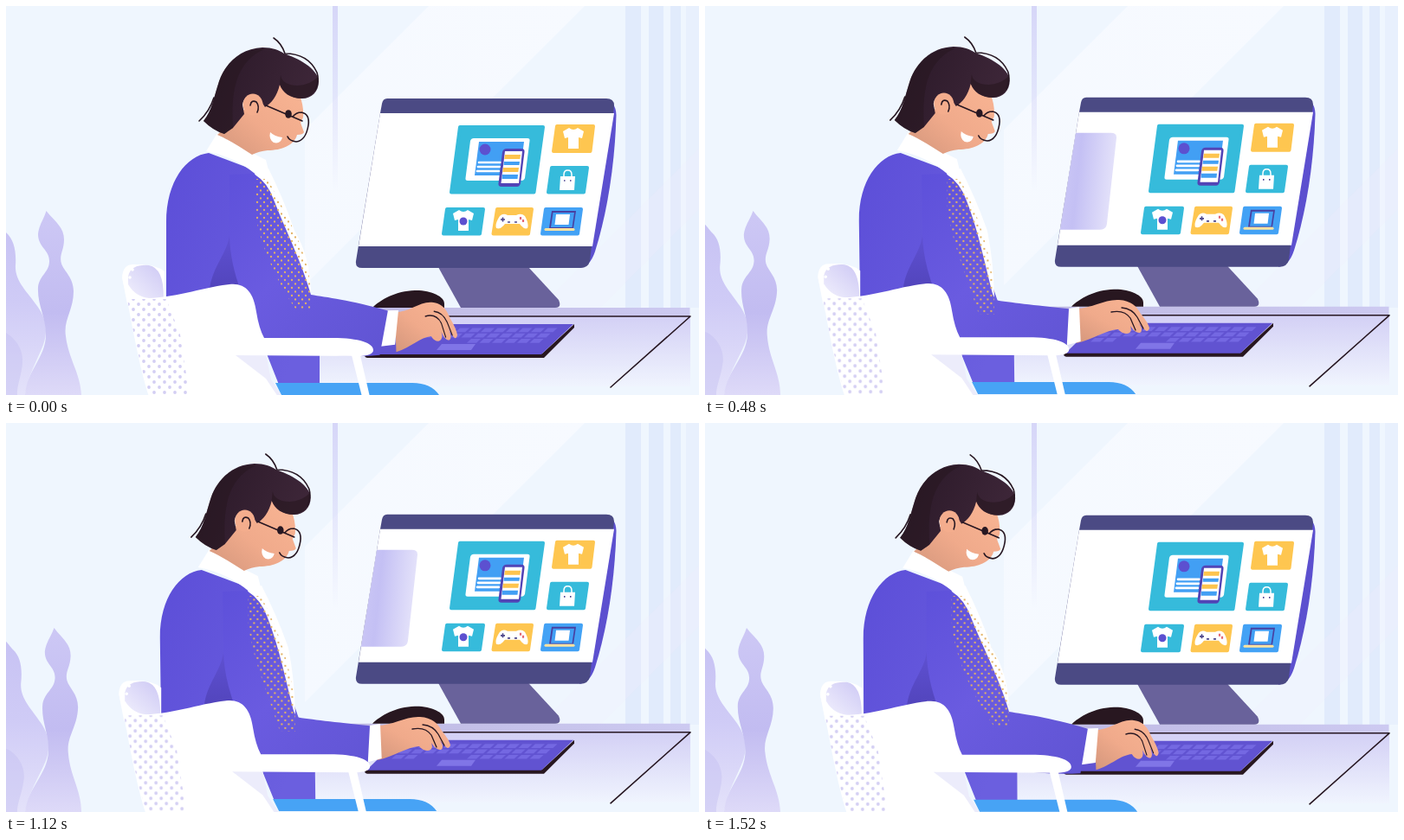
Recreate the animation shown at these times as an HTML page. Size 800 px wide and 450 px high, loop 1.6 s.

```html
<!DOCTYPE html>
<html lang="en">
<head>
<meta charset="utf-8">
<title>At the desk</title>
<style>
html, body { margin: 0; width: 100%; height: 100%; overflow: hidden; background: #eff6fe; }
svg { display: block; width: 800px; height: 450px; }
.tile { stroke-width: 4; stroke-linejoin: round; }
.cyan { fill: #36bbdb; stroke: #36bbdb; }
.gold { fill: #fec650; stroke: #fec650; }
.blue { fill: #43a2f5; stroke: #43a2f5; }
.ink { fill: none; stroke: #271722; stroke-width: 1.6; stroke-linecap: round; stroke-linejoin: round; }
.white { fill: #fff; }
</style>
</head>
<body>
<svg viewBox="0 0 800 450">
<defs>
  <linearGradient id="pole" x2="0" y2="1"><stop stop-color="#d6d6f8"/><stop offset="1" stop-color="#d6d6f8" stop-opacity="0"/></linearGradient>
  <linearGradient id="glare" x1="1" y1="0" x2="0" y2="1"><stop stop-color="#f7faff"/><stop offset="1" stop-color="#f5f9ff"/></linearGradient>
  <linearGradient id="leaf" x2="0" y2="1"><stop stop-color="#c6c1f3"/><stop offset=".5" stop-color="#cfcbf6"/><stop offset="1" stop-color="#e4e2fa"/></linearGradient>
  <linearGradient id="stem" x2="0" y2="1"><stop stop-color="#cdc8f5"/><stop offset=".55" stop-color="#c2bcf1"/><stop offset="1" stop-color="#dedaf8"/></linearGradient>
  <linearGradient id="desk" x2="0" y2="1"><stop stop-color="#d3d0f5"/><stop offset="1" stop-color="#f0f4fe"/></linearGradient>
  <linearGradient id="top" x2="1"><stop stop-color="#bdb8e2"/><stop offset="1" stop-color="#cdcaf1"/></linearGradient>
  <linearGradient id="panel" x2="1" y2=".15"><stop stop-color="#cfcbf6"/><stop offset=".45" stop-color="#c4c0f4"/><stop offset="1" stop-color="#e4e2fa"/></linearGradient>
  <linearGradient id="coat" x2="1" y2=".6"><stop stop-color="#5c4ed8"/><stop offset="1" stop-color="#6b5fdf"/></linearGradient>
  <linearGradient id="arm" gradientUnits="userSpaceOnUse" x1="240" y1="200" x2="430" y2="390"><stop stop-color="#5d50da"/><stop offset=".5" stop-color="#6a5be0"/><stop offset="1" stop-color="#6155d4"/></linearGradient>
  <linearGradient id="fold" x2="0" y2="1"><stop stop-color="#5f51d2"/><stop offset="1" stop-color="#4d40b4"/></linearGradient>
  <linearGradient id="knob" x1="1" x2="0" y2="1"><stop stop-color="#cdc8f4"/><stop offset="1" stop-color="#f1f0fd"/></linearGradient>
  <linearGradient id="skin" x1="1" x2="0" y2="1"><stop stop-color="#f9b594"/><stop offset=".55" stop-color="#f0aa8b"/><stop offset="1" stop-color="#d3967c"/></linearGradient>
  <linearGradient id="hair" x2="1" y2=".3"><stop stop-color="#2b1926"/><stop offset=".3" stop-color="#2f1c2c"/><stop offset="1" stop-color="#3d2638"/></linearGradient>
  <pattern id="gold" width="8" height="9" patternUnits="userSpaceOnUse"><g fill="#e2b264"><circle cx="2" cy="2" r="1.15"/><circle cx="6" cy="6.5" r="1.15"/></g></pattern>
  <pattern id="spots" width="12" height="12" patternUnits="userSpaceOnUse"><g fill="#d3cef3"><circle cx="3" cy="3" r="1.9"/><circle cx="9" cy="9" r="1.9"/></g></pattern>
  <clipPath id="screen"><path d="M432 124H702L677 278H407Z"/></clipPath>
  <path id="tee" d="M-5 -12Q0 -8 5 -12L12 -8 10 0 6 -1V12H-6V-1L-10 0-12 -8Z"/>
</defs>

<rect width="800" height="450" fill="#eff6fe"/>
<path d="M488 0H668L345 323V143Z" fill="url(#glare)"/>
<path d="M377 0h6V215h-6Z" fill="url(#pole)"/>
<path d="M715 0h18V349h-18ZM742 0h17V349h-17ZM767 0h12V349h-12Z" fill="#e1ebfc"/>
<path d="M785 0h15V349h-15Z" fill="#e8f0fd"/>
<path d="M800 165 616 349h70L800 235Z" fill="#efe9fb" opacity=".25"/>

<g id="plants">
  <path d="M-30 236L-14 248C-8 252 -4 258 0 262C9 270 12 283 11 300C10 318 24 330 36 347C46 361 49 375 43 392C36 410 25 428 22 450H-30Z" fill="url(#leaf)"/>
  <path d="M-20 372L0 378C10 384 20 396 19 412C18 428 12 440 13 450H-20Z" fill="#c4bef0" opacity=".45"/>
  <path d="M46.5 237C54 247 67 255 67 270C67 283 61 288 64 298C67 307 78 314 78 330C78 352 66 363 69 382C72 408 86 425 87 450H22C24 421 46 407 46 380C46 359 36 346 37 325C39 311 50 308 50 295C50 282 37 279 37 264C38 253 44 246 46.5 237Z" fill="url(#stem)"/>
</g>

<g id="set">
  <path d="M340 359H790V440H340Z" fill="url(#desk)"/>
  <path d="M360 349H789.5V359H360Z" fill="url(#top)"/>
  <path d="M499 302H603L638 340Q642 349 634 349H525Z" fill="#69629b"/>
  <path class="ink" d="M505 359H790L698 441"/>

  <path d="M690 108Q704 110 704.500 126C703 180 695 236 680 284Q674 302 662 303Z" fill="#5c50cf"/>
  <path d="M440 107H693Q702 107 702 115L701 124 676 278 674 295Q672 303 663 303H411Q403 303 404 295L432 124 434 113Q435 107 440 107Z" fill="#4b4a84"/>
  <path class="white" d="M432 124H702L677 278H407Z"/>
  <g clip-path="url(#screen)"><path id="slide" d="M-12 -61H33Q41 -61 40 -54L28 54Q27 61 19 61H-33Q-41 61 -40 54L-25 -52Q-23 -61 -12 -61Z" fill="url(#panel)"/></g>

  <g class="tile">
    <path class="cyan" d="M524 140H620L609.500 215.500H514Z"/>
    <path class="gold" d="M636 139H678L674.500 168H632Z"/>
    <path class="cyan" d="M630 187H671L667 215.500H626Z"/>
    <path class="cyan" d="M509 235H551L547 263.500H505Z"/>
    <path class="gold" d="M567 235H607L603 263.500H562.500Z"/>
    <path class="blue" d="M623 235H664L660 263.500H619Z"/>
  </g>
  <path class="white" d="M540 153H602Q605 153 604.500 156L599 199Q598 202 595 202H533Q530 202 530.500 199L536 156Q537 153 540 153Z"/>
  <path d="M546 157H598L593 196H541Z" fill="#429ff4"/>
  <circle cx="553" cy="166" r="6.500" fill="#5c50d0"/>
  <path d="M546 181H571M545 186H570M544 191H569" stroke="#fff" stroke-width="2.700" stroke-linecap="round"/>
  <path d="M578 165H595Q599 165 598.500 169L594 205Q593 209 590 209H572Q568 209 568.500 205L573 169Q574 165 578 165Z" fill="#5144b6"/>
  <path class="white" d="M576 168H596L592 205H571.500Z"/>
  <path d="M576 172H594L593.300 177H575.300ZM574 187H592L591.300 192H573.300Z" fill="#fdc44e"/>
  <path d="M575 180H593L592.500 184H574.500ZM573 195H591L590.500 200H572.500Z" fill="#429ff4"/>
  <use href="#tee" class="white" x="655" y="153"/>
  <use href="#tee" class="white" x="528" y="248"/>
  <circle cx="528" cy="249" r="4.500" fill="#5c50d0"/>
  <path class="white" d="M640 197H657L656 213H639Z"/>
  <path d="M644 198V195Q644 190 648.500 190T653 195V198" fill="none" stroke="#fff" stroke-width="1.500"/>
  <path d="M644 202h1.500M651 202h1.500" stroke="#443c8c" stroke-width="1.700"/>
  <path class="white" d="M570 243Q574 239 579 242H589Q595 239 599 243Q604 252 602 257Q598 259 593 252H576Q571 259 566 257Q564 252 570 243Z"/>
  <path d="M571 247h5M573.500 244.500v5M579 250h3M587 250h3" stroke="#4d478c" stroke-width="1.700"/>
  <path d="M594 244v3M597 247v3" stroke="#e46874" stroke-width="2.200"/>
  <path d="M630 237H658L655 257H627Z" fill="#4840a1"/>
  <path d="M631.500 239H656L653.500 256H629Z" fill="#429ff4"/>
  <path class="white" d="M635 241H651L649.500 253H633.500Z"/>
  <path d="M623 258.500H655" stroke="#ffe2a0" stroke-width="3" stroke-linecap="round"/>

  <path d="M423 349C432 340 450 329.500 472 329C490 328.500 507 336 506 345V349Z" fill="#281720"/>
  <path d="M416 402H619L656 368V372L621 407H417Q412 406 416 402Z" fill="#281720"/>
  <path d="M452 368H655L618 403H416Z" fill="#6153d1"/>
  <path id="keys" fill="#7468e2"/>
  <path d="M503 391H542L537 398H497Z" fill="#8075e7"/>
</g>

<g id="torso">
  <path d="M234 170C208 173 185 203 185 250V345L300 400 315 438H362V395L330 300 304 207 287 190Z" fill="url(#coat)"/>
  <path d="M258 265C256 285 238 302 235 327L278 350Z" fill="url(#fold)"/>
</g>
<path id="shirt" class="white"/>
<path id="legs" d="M311 436H466Q490 435 500 450H318Z" fill="#47a3f5"/>

<g id="hand">
  <path d="M-5 2C15 2 29 -9 46 -8C60 -7 66 -1 71 8Q80 19 81 25Q79 31 74 25L68 18Q75 27 70 30Q65 31 59 22Q62 30 55 31Q49 31 45 26C30 27 18 37 -3 42Z" fill="url(#skin)"/>
  <path class="ink" d="M49 1Q61 2 67 12L74 25M37 6Q52 3 59 13L65 27" style="stroke-width:1.3"/>
</g>
<path id="cuff" class="white"/>
<path id="sleeve" fill="url(#arm)"/>
<path id="dots" fill="url(#gold)"/>

<g id="head">
  <path class="white" d="M244 147 231 168Q264 174 290 196L303 190 300 178 280 168Z"/>
  <path d="M244 149 272 122 315 90 339 103Q344 116 343 129L340 135 344 146Q343 149 336 149C333 161 318 167 302 167Q292 168 284 172C271 164 258 155 244 149Z" fill="url(#skin)"/>
  <path d="M228 133C238 121 240 105 246 87C253 67 270 49 296 48C308 48 315 51 321 55C336 60 360 72 361 87C361 99 353 107 342 107C328 107 319 100 316 91C313 104 306 113 299 117L292 106Q276 99 273 114L275 125 262 141 252 148Q239 144 228 133Z" fill="url(#hair)"/>
  <path d="M228 133C238 121 240 105 246 87C253 67 270 49 298 50C262 66 260 106 262 141L252 148Q239 144 228 133Z" fill="#27161f" opacity=".5"/>
  <path d="M317 80Q318 88 328 91Q347 95 360 82Q362 104 341 107Q324 107 316 91Z" fill="#291821" opacity=".65"/>
  <ellipse cx="285" cy="114" rx="11.500" ry="12.500" fill="#f4ad8d"/>
  <path class="ink" d="M282 115Q283 108 289 111Q293 116 290 123"/>
  <path class="ink" d="M309 37Q318 43 322 55Q349 55 359 77Q362 87 357 97M223 133Q235 122 240 106"/>
  <path class="white" d="M305 146Q310 151 319 152Q317 160 309 158Q303 154 305 146Z"/>
  <path class="ink" d="M300 115 342 133M341 123Q351 125 349 138Q346 156 335 157Q327 156 325 151M341 123Q335 123 331 128"/>
  <ellipse id="eye" cx="326" cy="125" rx="3.800" ry="4.800" fill="#271722"/>
</g>

<g id="chair">
  <path class="white" d="M134 314Q135 298 148 299Q172 298 183 307V345H140Z"/>
  <path d="M141 313C143 302 153 299 165 300Q182 303 182 337Q153 343 141 322Z" fill="url(#knob)"/>
  <path class="white" d="M398 400H408L420 452H411Z"/>
  <path d="M262 400 300 403 306 432 319 452H245Z" fill="#ececfb"/>
  <path class="white" d="M134 312Q137 336 148 338C192 340 222 326 258 322C276 320 286 331 289 354Q292 373 298 384H377C408 384 424 390 424 398Q424 405 405 405L265 404 300 431 314 452H165C151 408 143 351 134 312Z"/>
  <path d="M140 339H185L201 380 212 452H166Q151 403 140 339Z" fill="url(#spots)"/>
  <g class="white"><circle cx="146" cy="305" r="1.800"/><circle cx="143" cy="314" r="1.800"/></g>
</g>
</svg>
<script>
const $ = id => document.getElementById(id);
const set = (id, name, value) => $(id).setAttribute(name, value);
const move = (id, value) => set(id, 'transform', value);
const lerp = (a, b, u) => a + (b - a) * u;

const LOOP = 1600, STEP = 80;
const SHEAR = .0137, SHIFT = -11;

// phase, wrist x, y, cuff angle, sleeve depth, hand scale x, y, elbow x, y
const POSES = [
  [0, 453, 352, 7, 54, .84, 1.15, 352, 334],
  [.1, 454, 353, 6, 54, .86, 1.15, 351, 334],
  [.4, 443, 346, -2, 42, .99, 1, 345, 333],
  [.6, 432, 348, -1, 44, 1, 1, 334, 340],
  [1, 430, 349, 0, 44, .97, 1, 333, 340]
];

function poseAt(p) {
  const i = Math.max(1, POSES.findIndex(k => k[0] >= p));
  const a = POSES[i - 1], b = POSES[i];
  const u = (p - a[0]) / (b[0] - a[0]);
  return a.map((v, n) => lerp(v, b[n], u)).slice(1);
}

function buildKeys() {
  let d = '';
  for (let row = 0; row < 3; row++)
    for (let col = 0; col < 12; col++) {
      const x = 466 + col * 14.5 - row * 8, y = 372.5 + row * 6.3;
      if (row < 2 || col < 2 || col > 5) d += `M${x} ${y}h11l-5 4.7h-11Z`;
    }
  set('keys', 'd', d);
}

function drawArm(p, lean) {
  const [wx, wy, angle, depth, sx, sy, ex, ey] = poseAt(p);
  const rad = angle * Math.PI / 180, cos = Math.cos(rad), sin = Math.sin(rad);
  const wrist = (x, y) => `${wx + x * cos - y * sin} ${wy + x * sin + y * cos}`;
  const body = (x, y) => `${x + lean * (SHEAR * y + SHIFT)} ${y}`;
  const elbow = (x, y) => `${ex + x} ${ey + y}`;

  move('hand', `translate(${wx} ${wy}) scale(${sx} ${sy})`);
  set('cuff', 'd', `M${wrist(-14, 2)}L${wrist(0, 0)} ${wrist(1, 40)} ${wrist(-15, 44)}Z`);
  set('sleeve', 'd', `M${body(258, 195)}L${body(286, 194)}Q${body(302, 204)} ${body(309, 224)}` +
    `C${body(323, 260)} ${elbow(-10, -36)} ${elbow(0, 0)}C${elbow(18, 3)} ${elbow(45, 6)} ${wrist(-12, 2)}` +
    `L${wrist(-15, depth)}C${body(390, 408)} ${body(345, 400)} ${body(304, 394)}` +
    `C${body(277, 350)} ${body(259, 310)} ${body(258, 265)}Z`);
  set('shirt', 'd', `M${body(287, 194)}L${body(303, 188)}Q${body(321, 224)} ${body(333, 260)}` +
    `Q${elbow(-1, -45)} ${elbow(0, -3)}L${elbow(-10, -20)}Z`);
  set('dots', 'd', `M${body(287, 200)}L${body(302, 200)}C${body(325, 245)} ${elbow(-3, -50)} ${elbow(0, -5)}` +
    `L${elbow(0, 17)} ${elbow(-18, 16)}C${body(308, 312)} ${body(289, 265)} ${body(287, 230)}Z`);
  set('gold', 'patternTransform', `translate(${-8 * lean} 0)`);
}

function draw(time) {
  const t = Math.floor((time % LOOP) / STEP) * STEP;
  const p = 1 - Math.abs(1 - 2 * t / LOOP);
  const lean = 1 - (1 - p) ** 3.3;

  move('plants', `matrix(1 0 ${-.0704 * p} 1 ${31.7 * p} 0)`);
  move('set', `translate(0 ${-2 * p})`);
  move('slide', `translate(${463 - 155 * (1 - p) ** 2} ${207 - 5 * p}) scale(${.78 + .23 * p})`);
  move('torso', `matrix(1 0 ${SHEAR * lean} 1 ${SHIFT * lean} 0)`);
  move('head', `translate(${-9.7 * lean} ${-1.6 * p})`);
  move('chair', `translate(${-4 * lean} ${-1.3 * p})`);
  move('legs', `translate(${-3 * lean} ${-1.5 * p})`);
  set('eye', 'ry', p > .8 ? 2.8 : 4.8);
  drawArm(p, lean);
}

function tick() {
  draw(performance.now());
  requestAnimationFrame(tick);
}

buildKeys();
tick();
</script>
</body>
</html>
```
